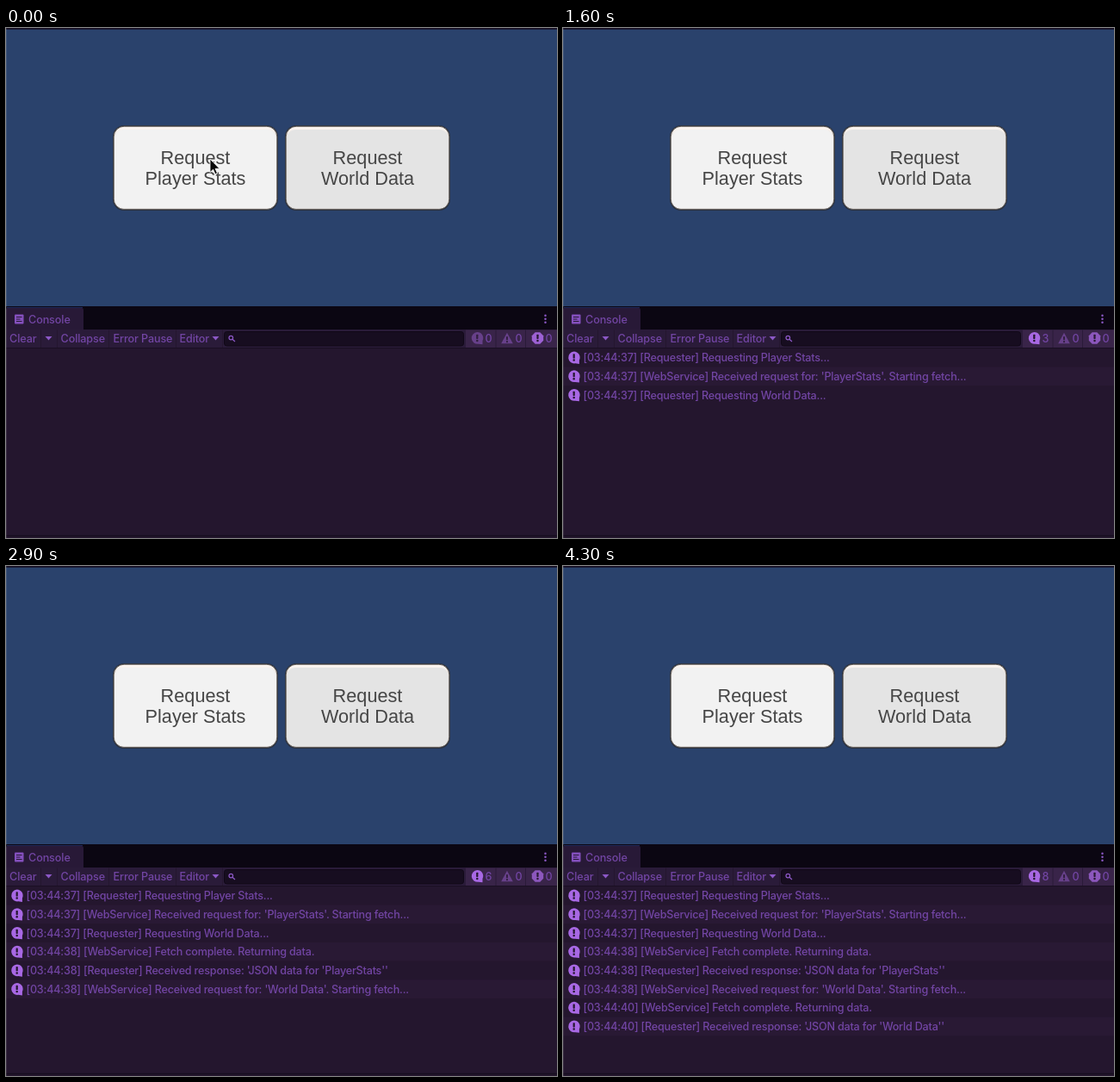
These frames come from a looping animation (640 by 592 pixels, 4.4 s). An HTML page:

```html
<!DOCTYPE html>
<html lang="en">
<head>
<meta charset="utf-8">
<title>Request console</title>
<style>
  html, body { margin: 0; width: 100%; height: 100%; overflow: hidden; background: #24162e; }
  svg { display: block; width: 640px; height: 592px; }
  text { font: 500 12.6px Inter, sans-serif; fill: #7245a4; letter-spacing: -.1px; }
  .log text { letter-spacing: -.2px; }
  .button text { font: 21.7px "Liberation Sans", Arial, sans-serif;
    letter-spacing: 0; text-anchor: middle; fill: #464646; }
  .icon { fill: #a868e4; }
  .dim { opacity: .42; }
</style>
</head>
<body>
<svg viewBox="0 0 640 592">
  <defs>
    <g id="mark">
      <rect x="-1.1" y="-4.3" width="2.2" height="5.2" rx=".6" fill="#24162e"/>
      <circle cy="3" r="1.25" fill="#24162e"/>
    </g>
    <g id="bubble">
      <path d="M0-7A6.9 6.9 0 1 0 1.5 6.7L6.2 7.3V3A6.9 6.9 0 0 0 0-7Z"/>
      <use href="#mark"/>
    </g>
    <g id="warning">
      <path d="M0-6.3L6.8 6.3H-6.8Z"/>
      <use href="#mark" transform="translate(0 1.6) scale(.85)"/>
    </g>
    <g id="error">
      <path d="M-2.8-6.7H2.8L6.7-2.8V2.8L2.8 6.7H-2.8L-6.7 2.8V-2.8Z"/>
      <use href="#mark"/>
    </g>
    <linearGradient id="rim" x2="0" y2="1">
      <stop offset="0" stop-color="#fff8f3"/>
      <stop offset=".12" stop-color="#e9e4e0"/>
      <stop offset="1" stop-color="#d2ccc8"/>
    </linearGradient>
  </defs>

  <rect width="640" height="323" fill="#2a426c"/>
  <rect width="640" height="1.7" fill="#150d22"/>
  <g id="buttons"></g>

  <rect y="323" width="640" height="27.5" fill="#0b0612"/>
  <path d="M0 350V327Q0 325 2 325H88Q90 325 90 327V350Z" fill="#281937"/>
  <path d="M1 324.5H89" stroke="#1e2858"/>
  <rect x="10" y="332.5" width="10.5" height="11" rx="1" fill="#8450bd"/>
  <path d="M12 335.5H18.5M12 338H16.5M12 340.5H18.5" stroke="#281937" stroke-width="1.1"/>
  <text x="26" y="342.6">Console</text>
  <g fill="#8c58c6">
    <circle cx="626.5" cy="333.8" r="1.25"/>
    <circle cx="626.5" cy="337.8" r="1.25"/>
    <circle cx="626.5" cy="341.8" r="1.25"/>
  </g>

  <rect y="350" width="640" height="21.5" fill="#2a1b39"/>
  <path d="M0 371.5H640" stroke="#1a0f23"/>
  <path d="M40.5 350.5V371M59.5 350.5V371M119.5 350.5V371M197.5 350.5V371M251.5 350.5V371" stroke="#24162f"/>
  <text x="4" y="364.8">Clear</text>
  <text x="63.5" y="364.8">Collapse</text>
  <text x="124.5" y="364.8">Error Pause</text>
  <text x="201.5" y="364.8">Editor</text>
  <path d="M45.5 358H53.5L49.5 362.5ZM239.5 358H247.5L243.5 362.5Z" fill="#8c58c6"/>
  <rect x="253.5" y="352.5" width="278" height="16.5" rx="3" fill="#170d20" stroke="#100817"/>
  <g fill="none" stroke="#8c58c6" stroke-width="1.2">
    <circle cx="261.3" cy="359.6" r="2.3"/>
    <path d="M263 361.3L266 364"/>
  </g>

  <rect x="534" y="350.5" width="34.5" height="20.5" fill="#392449"/>
  <rect x="569.5" y="350.5" width="33.5" height="20.5" fill="#392449"/>
  <rect x="604" y="350.5" width="36" height="20.5" fill="#392449"/>
  <g class="icon">
    <use id="logIcon" href="#bubble" x="547.3" y="360"/>
    <use class="dim" href="#warning" x="582" y="360"/>
    <use id="errorIcon" href="#error" x="617.5" y="360"/>
  </g>
  <text id="count" x="556.5" y="364.8">0</text>
  <text x="591.5" y="364.8">0</text>
  <text x="626.5" y="364.8">0</text>

  <rect y="372" width="640" height="220" fill="#24162e"/>
  <g id="log" class="log"></g>
  <path d="M0 589.5H640" stroke="#170d1f" stroke-width="1.6"/>
  <rect width="1" height="592" fill="#fff" opacity=".12"/>

  <path id="cursor" d="M0 0V15.6L3.6 12.2L6 17.7L8.5 16.6L6.1 11.3H11Z"
    fill="#080808" stroke="#f4f4f4" stroke-width=".9" stroke-linejoin="round"/>
</svg>
<script>
  const LOOP = 4400, STEP = 100, PITCH = 21.7;
  const NORMAL = 242, ACTIVE = 228, PRESSED = 192;
  const $ = id => document.getElementById(id);

  const lines = [
    [500, "37", "Requester", "Requesting Player Stats..."],
    [500, "37", "WebService", "Received request for: 'PlayerStats'. Starting fetch..."],
    [1200, "37", "Requester", "Requesting World Data..."],
    [2000, "38", "WebService", "Fetch complete. Returning data."],
    [2000, "38", "Requester", "Received response: 'JSON data for 'PlayerStats''"],
    [2000, "38", "WebService", "Received request for: 'World Data'. Starting fetch..."],
    [3500, "40", "WebService", "Fetch complete. Returning data."],
    [3500, "40", "Requester", "Received response: 'JSON data for 'World Data''"]
  ];

  $("log").innerHTML = lines.map(([, sec, tag, msg], i) => {
    const y = 382.6 + i * PITCH;
    const band = i % 2 ? `<rect y="${y - PITCH / 2}" width="640" height="${PITCH}" fill="#291934"/>` : "";
    return `<g>${band}<use class="icon" href="#bubble" x="12.7" y="${y}"/>
      <text x="23.5" y="${y + 4.6}">[03:44:${sec}] [${tag}] ${msg}</text></g>`;
  }).join("");

  $("buttons").innerHTML = [[125, "Player Stats"], [325, "World Data"]].map(([x, label]) => `
    <g class="button">
      <rect x="${x - 1}" y="113" width="192" height="99" rx="13" fill="#2c3039" opacity=".85"/>
      <rect x="${x + .2}" y="114.2" width="189.6" height="96.2" rx="12" fill="url(#rim)" stroke="#5c5652" stroke-width=".9"/>
      <rect class="face" x="${x + 1}" y="118" width="188" height="91.6" rx="10.5"/>
      <text x="${x + 95}" y="158">Request</text>
      <text x="${x + 95}" y="182.4">${label}</text>
    </g>`).join("");

  const rows = [...$("log").children];
  const faces = [...document.querySelectorAll(".face")];

  // Value of a list of [time, value] points, linear in between.
  function track(points, t) {
    let [t0, v0] = points[0];
    for (const [t1, v1] of points) {
      if (t < t1) return v0 + (v1 - v0) * (t - t0) / (t1 - t0);
      [t0, v0] = [t1, v1];
    }
    return v0;
  }

  const shades = [
    [[0, NORMAL], [100, ACTIVE], [300, ACTIVE], [400, PRESSED], [500, ACTIVE], [1100, ACTIVE], [1200, NORMAL]],
    [[0, ACTIVE], [300, ACTIVE], [400, NORMAL], [800, NORMAL], [900, ACTIVE], [1000, ACTIVE], [1100, PRESSED], [1200, ACTIVE]]
  ];

  function draw(now) {
    const t = Math.floor(now % LOOP / STEP) * STEP;
    let shown = 0;
    rows.forEach((row, i) => {
      const on = t >= lines[i][0];
      row.style.display = on ? "" : "none";
      shown += on;
    });
    $("count").textContent = shown;
    $("logIcon").style.opacity = shown ? 1 : .42;
    $("errorIcon").style.opacity = shown ? .75 : .9;

    faces.forEach((face, i) => {
      const v = Math.round(track(shades[i], t));
      face.style.fill = `rgb(${v},${v},${v})`;
    });

    const p = Math.min(1, Math.max(0, (t - 500) / 500));
    const k = p * p * (3 - 2 * p);
    $("cursor").setAttribute("transform", `translate(${237 + 159.5 * k} ${152 + 3 * k})`);
    $("cursor").style.display = t < 1400 ? "" : "none";
  }

  const start = performance.now();
  function tick() {
    draw(performance.now() - start);
    requestAnimationFrame(tick);
  }
  tick();
</script>
</body>
</html>
```
